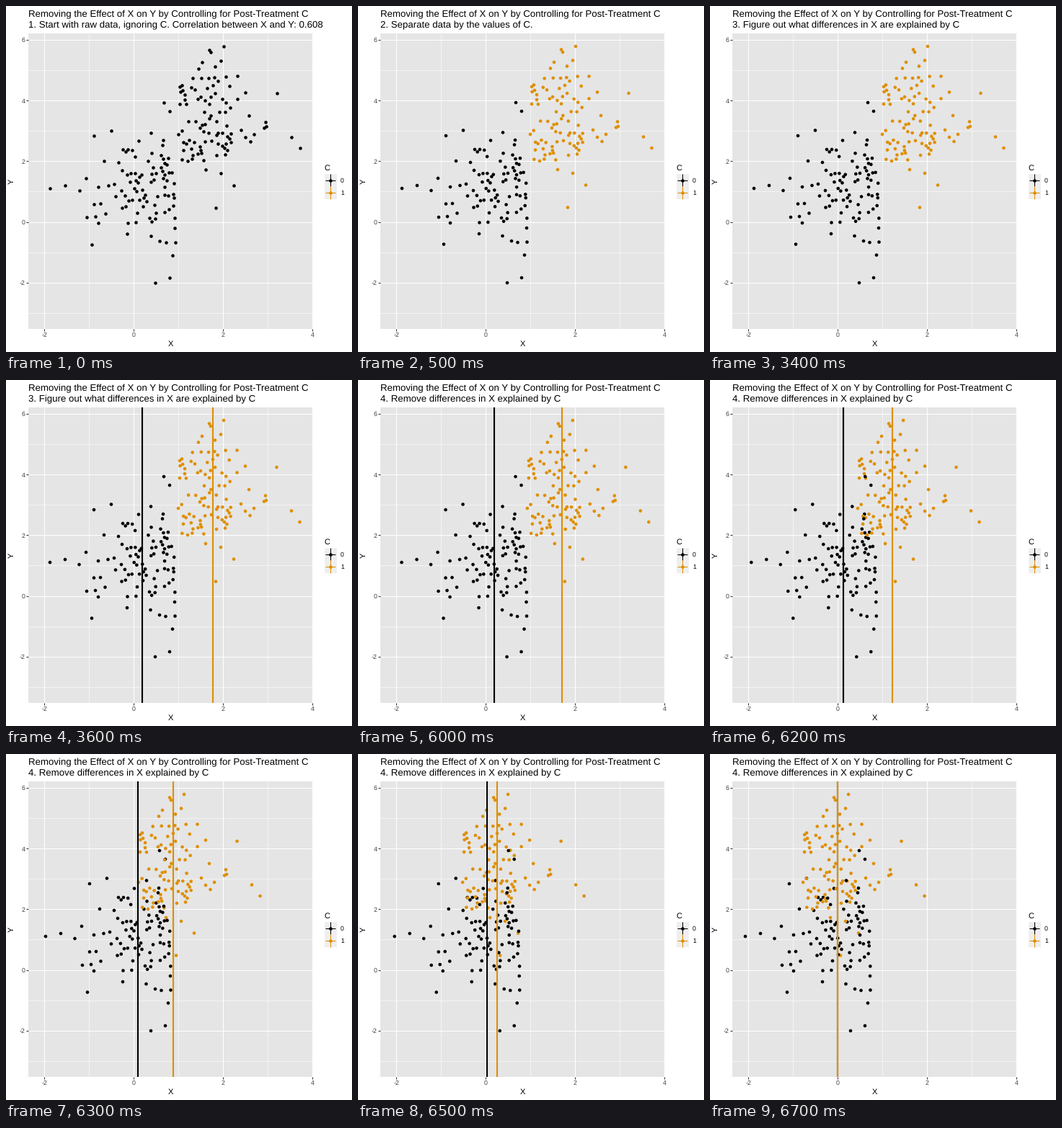
A matplotlib script that plays this animation: 480 by 480 pixels, repeating every 8 s.

```python
import numpy as np
import matplotlib.pyplot as plt
from matplotlib.animation import FuncAnimation
from matplotlib.patches import Rectangle
from matplotlib.ticker import FuncFormatter, MultipleLocator

plt.rcParams.update({"font.family": "Liberation Sans", "text.hinting": "none"})

SIZE, DPI = 480, 72          # at 72 dpi one point is one pixel
STEP, FRAMES = 100, 80
LEFT, RIGHT, TOP, BOTTOM = 31.3, 424.9, 37.5, 447.5
ORIGIN = np.array([177.0, 299.5])
SCALE = np.array([61.95, -42.06])
BLACK, ORANGE, PANEL, KEY = "#000000", "#de8f05", "#e5e5e5", "#efefef"
MEANS = np.array([0.194, 1.775])

TITLE = "Removing the Effect of X on Y by Controlling for Post-Treatment C"
STAGES = [
    (0, "1. Start with raw data, ignoring C. Correlation between X and Y: 0.608"),
    (500, "2. Separate data by the values of C."),
    (3400, "3. Figure out what differences in X are explained by C"),
    (6000, "4. Remove differences in X explained by C"),
]
COLOR_AT, LINES_AT, MOVE_AT, MOVE_STEPS = 500, 3600, 6000, 8

# Outlying observations in stage pixels; the dense cores are sampled.
OUTER_0 = [
    (61, 253), (82, 249), (101.5, 256), (111, 239), (112, 293), (119, 330.5),
    (122, 274.5), (122, 180), (124, 292), (128, 301), (131, 274), (128, 251),
    (136, 215), (137.5, 287.5), (141.5, 249), (146, 172.5), (156, 217),
    (152, 263.5), (160, 256), (161, 228), (160.5, 279.5), (162, 199),
    (168, 316), (168.5, 300.5), (184, 186.5), (201, 175.5), (200.5, 319),
    (207, 384), (213, 326), (221.5, 328), (227, 377), (231, 345.5),
    (234.5, 327.5), (234, 308), (219, 134), (227, 146), (217, 192.5),
    (218, 186), (182, 287), (169, 199), (199, 294), (150, 247),
]
OUTER_1 = [
    (302, 56), (282, 60.5), (284, 64), (298, 75.5), (272, 78), (267, 86.5),
    (290, 83.5), (320.5, 97.5), (332, 119.5), (320.5, 128.5), (337, 152),
    (326, 172), (360, 160.5), (358, 168.5), (361, 167), (375.5, 121),
    (396, 181.5), (407.5, 197), (344, 178), (332, 182), (338.5, 188),
    (306.5, 200), (292, 207), (277, 227), (298, 232), (316, 248.5),
    (291, 279.5), (244, 109.5), (252, 215), (239, 178), (241, 136),
    (304, 205.5),
]

rng = np.random.default_rng(12)


def draw_core_0():
    x = 164 + 73.5 * rng.random() ** 0.75
    y = rng.normal(249, 28)
    return x, y, 199 < y < 306


def draw_core_1():
    x, y = rng.uniform(241, 312), rng.uniform(95, 214)
    above = y > 95 + 0.6 * max(0, 266 - x)
    below = y < 214 - 0.6 * max(0, x - 278)
    return x, y, above and below


def fill(points, draw, total, gap=3.6):
    """Add sampled points, kept slightly apart, until there are enough."""
    points = list(points)
    while len(points) < total:
        x, y, inside = draw()
        if inside and all(np.hypot(x - a, y - b) > gap for a, b in points):
            points.append((x, y))
    return points


def to_data(px):
    return (np.asarray(px) - ORIGIN) / SCALE


raw = fill(OUTER_0, draw_core_0, 100) + fill(OUTER_1, draw_core_1, 100)
order = rng.permutation(200)
data = to_data(raw)[order]
group = np.repeat([0, 1], 100)[order]
group_colors = np.array([BLACK, ORANGE])[group]

fig = plt.figure(figsize=(SIZE / DPI, SIZE / DPI), dpi=DPI, facecolor="white")

# Stage in pixels, for titles and legend
stage = fig.add_axes([0, 0, 1, 1])
stage.set(xlim=(0, SIZE), ylim=(SIZE, 0))
stage.axis("off")


def label(x, y, text, size, **kw):
    return stage.text(x, y, text, fontsize=size, color="black", **kw)


label(31.3, 15.2, TITLE, 13.2)
subtitle = label(31.3, 29.8, "", 13.2)
label(228, 472, "X", 11, ha="center")
label(13.3, 243, "Y", 11, ha="right", va="center", rotation=90)
label(441.5, 227.5, "C", 11)
for i, color in enumerate((BLACK, ORANGE)):
    y = 241.7 + 17.28 * i
    stage.add_patch(Rectangle((441.7, y - 8.64), 17.28, 17.28, fc=KEY, lw=0))
    stage.plot([450.3, 450.3], [y - 8.64, y + 8.64], color=color, lw=1.07,
               solid_capstyle="butt")
    stage.plot([443.4, 457.3], [y, y], color=color, lw=1.07,
               solid_capstyle="butt")
    stage.plot(450.3, y, "o", color=color, ms=4.6, mew=0)
    label(464, y + 3.2, str(i), 8.8)

# Plot panel in data units
ax = fig.add_axes([LEFT / SIZE, 1 - BOTTOM / SIZE,
                   (RIGHT - LEFT) / SIZE, (BOTTOM - TOP) / SIZE],
                  facecolor=PANEL)
(x0, y0), (x1, y1) = to_data([(LEFT, BOTTOM), (RIGHT, TOP)])
ax.set(xlim=(x0, x1), ylim=(y0, y1))
ax.spines[:].set_visible(False)
ax.set_axisbelow(True)
for axis in (ax.xaxis, ax.yaxis):
    axis.set_major_locator(MultipleLocator(2))
    axis.set_minor_locator(MultipleLocator(1))
    axis.set_major_formatter(FuncFormatter(lambda v, _: f"{v:.0f}"))
ax.grid(which="major", color="white", lw=1.07)
ax.grid(which="minor", color="white", lw=0.55)
ax.tick_params(which="major", length=2.75, width=1.07, pad=2.2,
               color="#333333", labelcolor="#404040", labelsize=8.8)
ax.tick_params(which="minor", length=0)

dots = ax.scatter(data[:, 0], data[:, 1], s=4.6 ** 2, lw=0, zorder=3)
mean_lines = [ax.axvline(m, color=c, lw=2.13, zorder=4)
              for m, c in zip(MEANS, (BLACK, ORANGE))]


def eased(t):
    """Sine ease in and out; the first move frame is already one step in."""
    k = np.clip((t - MOVE_AT) / STEP + 1, 0, MOVE_STEPS)
    return (1 - np.cos(np.pi * k / MOVE_STEPS)) / 2


def update(frame):
    t = frame * STEP
    subtitle.set_text([text for start, text in STAGES if t >= start][-1])
    dots.set_facecolor(group_colors if t >= COLOR_AT else BLACK)
    shift = MEANS * eased(t)
    dots.set_offsets(np.column_stack([data[:, 0] - shift[group], data[:, 1]]))
    for line, x in zip(mean_lines, MEANS - shift):
        line.set_xdata([x, x])
        line.set_visible(t >= LINES_AT)
    return [subtitle, dots, *mean_lines]


anim = FuncAnimation(fig, update, frames=FRAMES, interval=STEP,
                     repeat=True, repeat_delay=0, blit=False)
plt.show()
```
